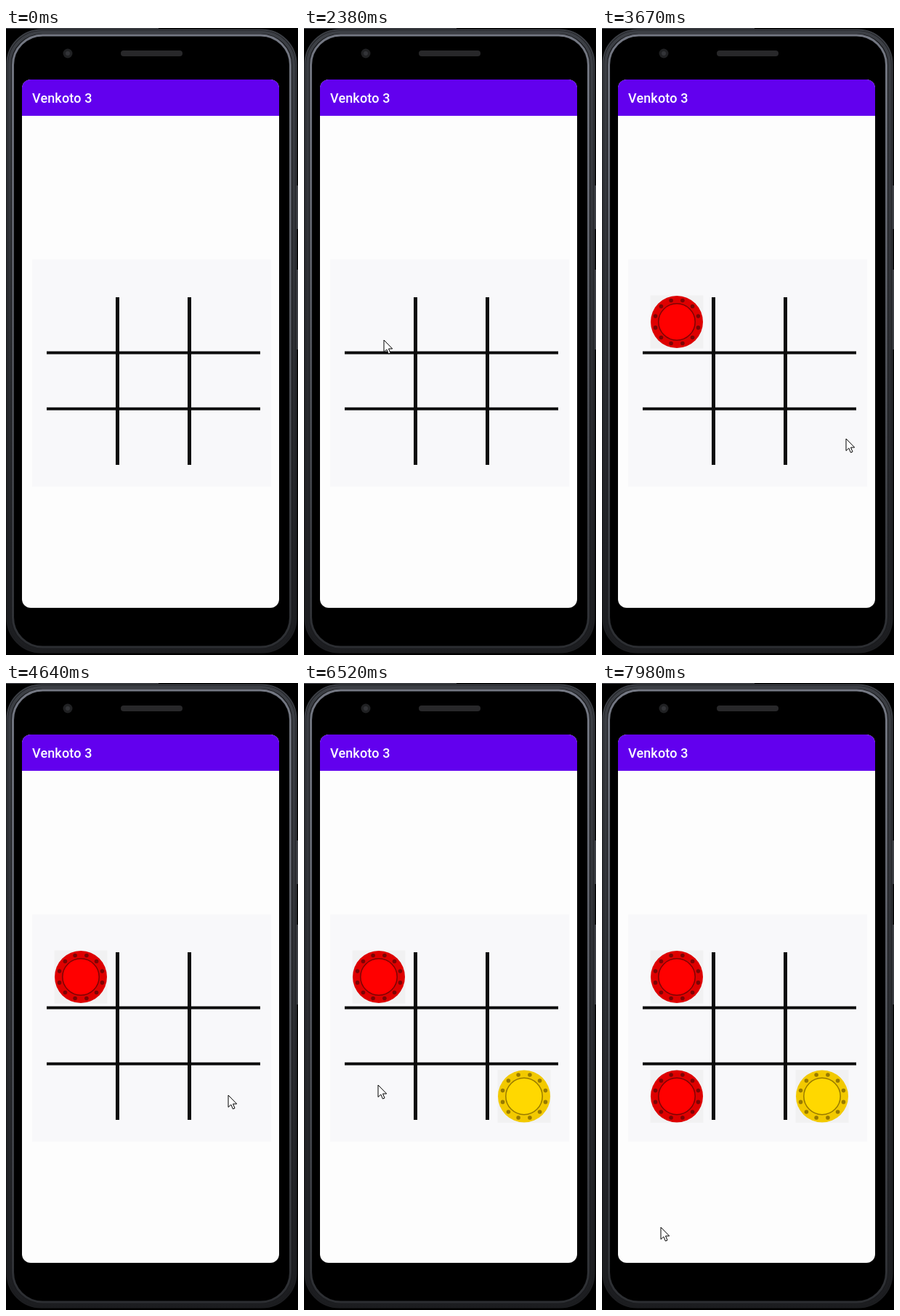
An HTML page for the animation above (8 s loop, 402 px wide and 864 px high).

```html
<!DOCTYPE html>
<html lang="en">
<head>
<meta charset="utf-8">
<title>Three in a row</title>
<style>
  html, body { margin: 0; height: 100%; overflow: hidden; background: #000; }
  svg { display: block; width: 100vw; height: 100vh; }
  text { font: 500 18px Roboto, sans-serif; letter-spacing: .14px; fill: #fff; }
</style>
</head>
<body>
<svg viewBox="0 0 402 864">
  <defs>
    <clipPath id="screen"><rect x="22" y="71" width="354" height="728" rx="12"/></clipPath>
    <clipPath id="content"><rect x="22" y="121" width="354" height="678"/></clipPath>
    <linearGradient id="metal" x2="0" y2="1">
      <stop stop-color="#747883"/>
      <stop offset=".5" stop-color="#4f5259"/>
      <stop offset="1" stop-color="#2c2e32"/>
    </linearGradient>
    <linearGradient id="edge" x2="0" y2="1">
      <stop stop-color="#3c3f45"/>
      <stop offset="1" stop-color="#1c1d20"/>
    </linearGradient>
  </defs>

  <!-- phone -->
  <rect width="402" height="864"/>
  <path d="M0 .5H210" stroke="#4a4c52"/>
  <path d="M400.5 217v60M400.5 333v110" stroke="#404247" stroke-width="3"/>
  <rect x="1.5" y="2.5" width="398" height="858" rx="47" fill="#191a1d" stroke="url(#edge)" stroke-width="2"/>
  <rect x="5" y="6" width="391" height="851" rx="44" fill="none" stroke="url(#edge)" stroke-width="4"/>
  <rect x="9.500" y="10" width="382" height="843" rx="41" stroke="url(#metal)" stroke-width="3"/>
  <circle cx="85" cy="35" r="6.500" fill="#202123"/>
  <circle cx="85" cy="35" r="3" fill="#333438"/>
  <rect x="158" y="31" width="85" height="8" rx="4" fill="#28282a"/>

  <g clip-path="url(#screen)">
    <rect x="22" y="71" width="354" height="728" fill="#fdfdfd"/>
    <rect x="22" y="71" width="354" height="50" fill="#6200ee"/>
    <text x="36" y="103">Venkoto 3</text>
    <rect x="36" y="319" width="329" height="313" fill="#f8f8fa"/>
    <g fill="none" stroke="#0c0c0c">
      <path d="M153.500 371V602M252.500 371V602" stroke-width="5"/>
      <path d="M56 447.500H350M56 524.700H350" stroke-width="4"/>
    </g>
    <g id="chips" clip-path="url(#content)"></g>
  </g>

  <path id="cursor" d="M0 0V16.500L3.800 13L6.400 19L9 17.900L6.500 12H11.700Z" fill="#fff" stroke="#000"/>
</svg>
<script>
const LOOP = 8000, FALL = 300, DROP = 492, SPIN = 3600;

const red = { rim: '#de0000', face: '#ff0000', mark: '#7c0404' };
const yellow = { rim: '#f2c900', face: '#ffd800', mark: '#987a00' };

const chips = [
  { x: 103, y: 405, start: 2665, paint: red },
  { x: 303, y: 569.5, start: 5155, paint: yellow },
  { x: 103, y: 569.5, start: 7150, paint: red }
];

// time, x, y of the pointer tip
const pointerPath = [
  [800, 112, 866], [1300, 118, 492], [1500, 118, 492], [2100, 110, 430],
  [2660, 110, 430], [3180, 366, 584], [3600, 336, 566], [3700, 336, 566],
  [4250, 306, 568], [5130, 306, 568], [5450, 264, 755], [5600, 264, 755],
  [6250, 102, 554], [7160, 102, 554], [7650, 81, 750], [8000, 81, 750]
];

const ease = p => (1 - Math.cos(Math.PI * p)) / 2;
const clamp = v => Math.min(1, Math.max(0, v));
const cursor = document.getElementById('cursor');

function chipMarkup({ rim, face, mark }) {
  let dots = '';
  for (let i = 0; i < 12; i++) {
    const a = (i * 30 + 15) * Math.PI / 180;
    dots += `<circle cx="${30.5 * Math.cos(a)}" cy="${30.5 * Math.sin(a)}" r="2.8" fill="${mark}"/>`;
  }
  return `<rect x="-36.500" y="-36.500" width="73" height="73" fill="#f1f1f2"/>
    <circle r="36" fill="${rim}"/>${dots}
    <circle r="25.200" fill="${face}" stroke="${mark}" stroke-width="1.500"/>`;
}

for (const chip of chips) {
  chip.node = document.createElementNS('http://www.w3.org/2000/svg', 'g');
  chip.node.innerHTML = chipMarkup(chip.paint);
  document.getElementById('chips').append(chip.node);
}

function place(node, visible, transform) {
  node.setAttribute('visibility', visible ? 'visible' : 'hidden');
  node.setAttribute('transform', transform);
}

function pointerAt(t) {
  const i = Math.max(1, pointerPath.findIndex(k => k[0] > t));
  const [t0, x0, y0] = pointerPath[i - 1], [t1, x1, y1] = pointerPath[i];
  const p = ease(clamp((t - t0) / (t1 - t0)));
  return [x0 + (x1 - x0) * p, y0 + (y1 - y0) * p];
}

function draw(t) {
  for (const { node, x, y, start } of chips) {
    const p = ease(clamp((t - start) / FALL));
    place(node, t >= start, `translate(${x} ${y - DROP * (1 - p)}) rotate(${SPIN * p})`);
  }
  place(cursor, t >= pointerPath[0][0], `translate(${pointerAt(t)})`);
}

const began = performance.now();
function frame() {
  draw((performance.now() - began) % LOOP);
  requestAnimationFrame(frame);
}
frame();
</script>
</body>
</html>
```
